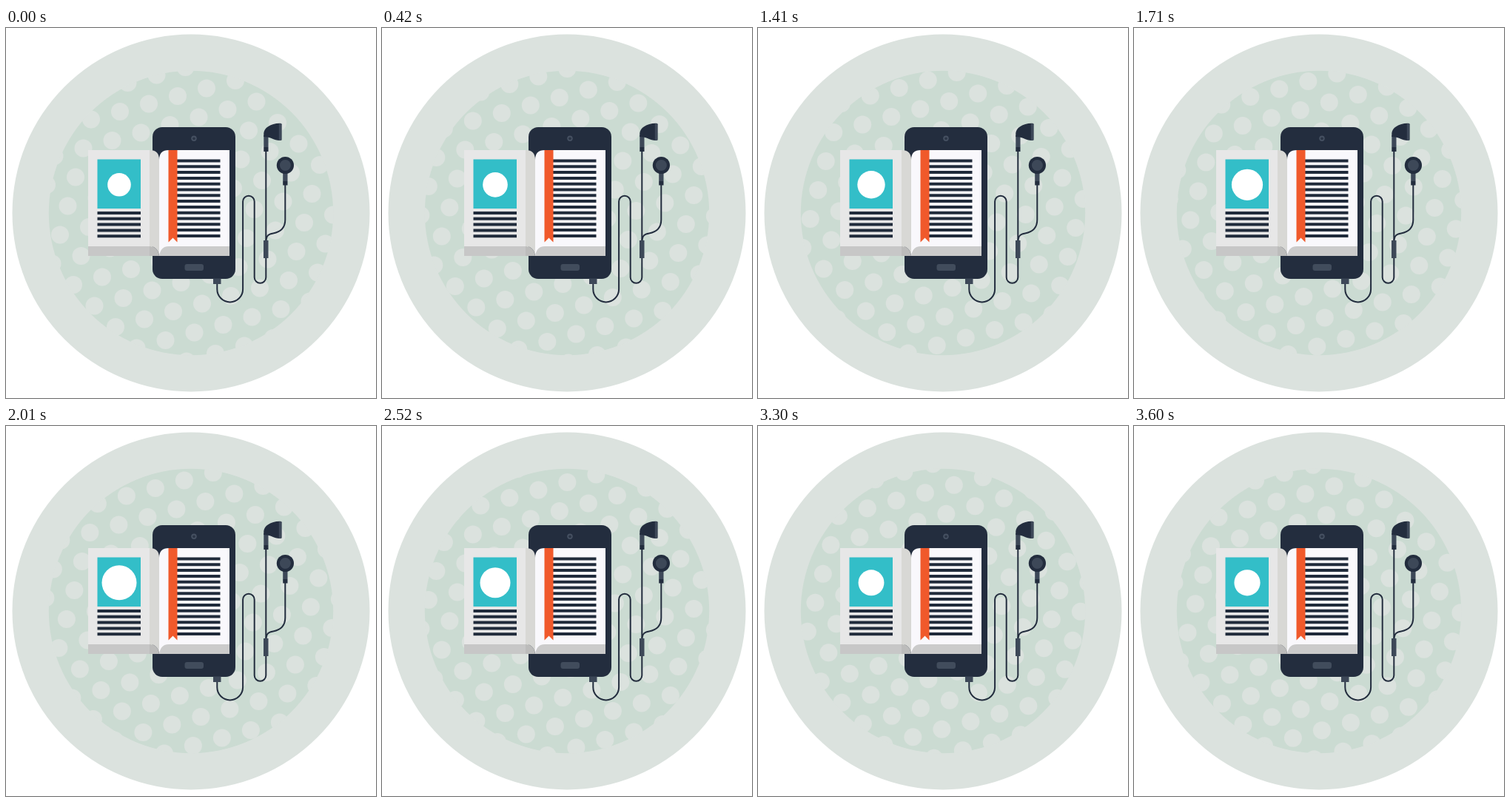
These frames come from a looping animation (500 by 500 pixels, 3630 ms). An HTML page with a canvas:

```html
<!DOCTYPE html>
<html lang="en">
<head>
<meta charset="utf-8">
<title>Reading and listening</title>
<style>
  html, body { margin: 0; width: 100%; height: 100%; overflow: hidden; background: #fff; }
  canvas { display: block; width: 500px; height: 500px; }
</style>
</head>
<body>
<canvas id="stage" width="500" height="500"></canvas>
<script>
const ctx = document.getElementById('stage').getContext('2d');
const LOOP = 3630, STEP = 30;
const NAVY = '#232d3e', SLATE = '#3d4858', PALE = '#dbe2de', MINT = '#cbdbd2';

// Slanted lattice; one loop travels exactly two columns and one row.
const COL = [39, -10.5], ROW = [-10.5, 39], ORIGIN = [232, 92];
const PULSE = [[0, 15.8], [870, 18], [1410, 18.7], [2010, 23.5],
               [2520, 20.5], [3000, 17.3], [3600, 17.6], [LOOP, 15.8]];

function rect(color, x, y, w, h, radius = 0) {
  ctx.fillStyle = color;
  ctx.beginPath();
  ctx.roundRect(x, y, w, h, radius);
  ctx.fill();
}

function disc(color, x, y, r) {
  ctx.fillStyle = color;
  ctx.beginPath();
  ctx.arc(x, y, r, 0, Math.PI * 2);
  ctx.fill();
}

function shape(color, path) {
  ctx.fillStyle = color;
  ctx.fill(new Path2D(path));
}

function wire(path) {
  ctx.strokeStyle = NAVY;
  ctx.lineWidth = 2;
  ctx.stroke(new Path2D(path));
}

function textLines(x, y, width, count) {
  for (let i = 0; i < count; i++) rect('#202b3b', x, y + i * 7.8 - 2, width, 4);
}

function pulseRadius(t) {
  const i = PULSE.findIndex(([time]) => time > t);
  const [t0, r0] = PULSE[i - 1], [t1, r1] = PULSE[i];
  const k = (1 - Math.cos(Math.PI * (t - t0) / (t1 - t0))) / 2;
  return r0 + (r1 - r0) * k;
}

function drawBackground(progress) {
  disc(PALE, 250, 250, 241.5);
  disc(MINT, 250, 250, 192.2);
  ctx.save();
  ctx.beginPath();
  ctx.arc(250, 250, 193, 0, Math.PI * 2);
  ctx.clip();
  for (let row = -4; row <= 12; row++) {
    for (let col = -10; col <= 10; col++) {
      const u = col + 2 * progress, v = row + progress;
      disc(PALE, ORIGIN[0] + u * COL[0] + v * ROW[0],
                 ORIGIN[1] + u * COL[1] + v * ROW[1], 12);
    }
  }
  ctx.restore();
}

function drawPhone() {
  rect(NAVY, 198, 134, 112, 205, 13);
  disc('#465162', 254, 149.3, 3.7);
  disc('#2b3546', 254, 149.3, 1.9);
  rect('#414c5c', 241.5, 319, 25.5, 9, 3);
}

function drawBook(t) {
  rect('#c7c7c7', 111, 295, 83, 13);
  shape('#bcbcbb', 'M194 295 Q205 295 207 308 H194 Z');
  rect('#e7e7e7', 111, 165, 83, 130);
  shape('#d8d8d5', 'M194 165 Q207 165 207 178 V308 Q205 295 194 295 Z');
  shape('#f9f8fc', 'M302 165 H220 Q207 165 207 178 V308 H302 Z');
  shape('#cbcbcb', 'M302 295 H220 Q209 295 207 308 H302 Z');

  rect('#33bec8', 123.5, 177.5, 58.5, 66.5);
  disc('#fff', 153, 211.8, pulseRadius(t));
  textLines(123.5, 250, 58.5, 5);
  textLines(231, 179.5, 58.5, 14);
  shape('#f0592b', 'M219.5 165 H231.5 V289.5 L225.5 283.5 L219.5 289.5 Z');
}

function drawEarphones() {
  wire('M285.3 345 V353 A17.4 17.4 0 0 0 320.1 353 V234.5' +
       ' A7.8 7.8 0 0 1 335.7 234.5 V337 A7.8 7.8 0 0 0 351.3 337 V160');
  wire('M351.3 290 C351.3 280 355 278.5 361 277.5 C372 275.5 377.3 270 377.3 259 V208');
  rect(SLATE, 280, 338.5, 10.5, 7.5);
  rect(SLATE, 348, 287, 6.5, 24);

  rect(SLATE, 348.3, 145, 6.2, 16);
  rect(NAVY, 348.3, 161, 6.2, 6);
  shape(NAVY, 'M348.3 147 V142 C349 135 357 129 370 128.7 V152 C362 152 358 147 348.3 147 Z');
  rect(SLATE, 368.8, 128.7, 3.9, 23.3, 1.5);

  rect(SLATE, 374.2, 195, 6.3, 12);
  rect(NAVY, 374.2, 207, 6.3, 5.5);
  disc(NAVY, 377.4, 185.5, 11.6);
  disc(SLATE, 377.4, 185.5, 7.5);
}

function render(now) {
  const t = Math.floor((now % LOOP) / STEP) * STEP;
  ctx.fillStyle = '#fff';
  ctx.fillRect(0, 0, 500, 500);
  drawBackground(t / LOOP);
  drawPhone();
  drawBook(t);
  drawEarphones();
}

const start = performance.now();
function tick() {
  render(performance.now() - start);
  requestAnimationFrame(tick);
}
tick();
</script>
</body>
</html>
```
